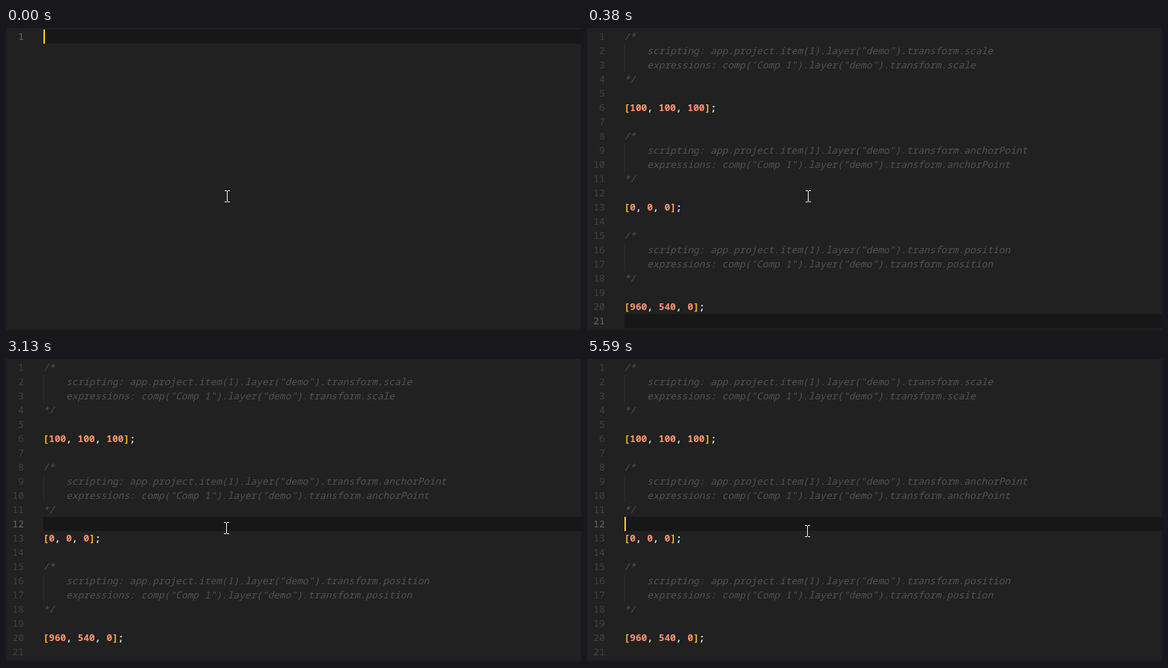
An HTML page for the animation above (5.64 s loop, 768 px wide and 405 px high).

```html
<!DOCTYPE html>
<html lang="en">
<head>
<meta charset="utf-8">
<title>Code editor</title>
<style>
html, body { margin: 0; width: 100%; height: 100%; overflow: hidden; background: #212121; }
#stage {
  position: relative; width: 768px; height: 405px; overflow: hidden; background: #212121;
  font: 400 12.833px/19px "Noto Sans Mono", "DejaVu Sans Mono", monospace;
  font-variant-ligatures: none; color: #cfeaee;
}
#stage div, #stage svg { position: absolute; }
.view { inset: 0; }
.line { left: 0; width: 768px; height: 19px; white-space: pre; }
.line i, .line b { position: absolute; top: 0; height: 19px; font-style: normal; font-weight: 400; }
.line i { right: 744px; color: #424242; }
.line b { left: 50px; font-weight: 600; text-indent: -.5px; }
.line .comment { color: #535353; font-style: italic; font-weight: 400; }
.num { color: #ff946f; }
.bracket { color: #ffb62c; font-weight: 800; }
.guide::before { content: ""; position: absolute; left: 50px; width: 1px; height: 19px; background: #2d2d2d; }
.selected b { padding-right: 7.7px; background: #2b2b2a; border-radius: 2px; }
.selected .guide::before { content: none; }
.active { background: linear-gradient(90deg, #212121 50px, #171717 50px); }
.active i { color: #686868; }
#caret { left: 50px; width: 2px; height: 19px; background: #fc0; }
#fade { left: 0; right: 0; bottom: 0; height: 4px; background: linear-gradient(#21212100, #1a1a1a); }

/* 1% = 56.4 ms */
#stage .anim { animation: 5640ms step-end infinite; }
#stage #first { animation-name: first; }
#stage #raw { animation-name: raw; }
#stage #tidy { animation-name: tidy; }
#stage #last { animation-name: last; }
#stage #middle { animation-name: middle; }
#stage #caret { animation-name: blink, caretLine; }
#stage #mouse { animation-name: mouse; }
@keyframes first { 0% { opacity: 1 } 4.964%, 100% { opacity: 0 } }
@keyframes raw { 0% { opacity: 0 } 4.964% { opacity: 1 } 6.737%, 100% { opacity: 0 } }
@keyframes tidy { 0% { opacity: 0 } 6.737%, 100% { opacity: 1 } }
@keyframes last { 0% { opacity: 0 } 6.737% { opacity: 1 } 11.702%, 100% { opacity: 0 } }
@keyframes middle { 0% { opacity: 0 } 11.702%, 100% { opacity: 1 } }
@keyframes caretLine { 0% { top: 2px } 11.702%, 100% { top: 211px } }
@keyframes blink {
  0%, 11.702%, 28.9%, 46.453%, 64.539%, 81.914%, 99.113%, 100% { opacity: 1 }
  1.773%, 20.39%, 37.943%, 55.496%, 72.163%, 90.07% { opacity: 0 }
}
@keyframes mouse {
  0% { transform: translate(292px, 217px) }
  15.425% { transform: translate(292px, 218px) }
  29.787% { transform: translate(291px, 218px) }
  86.879% { transform: translate(291px, 219px) }
  96.808% { transform: translate(291px, 220px) }
  98.049% { transform: translate(291px, 221px) }
  99.113%, 100% { transform: translate(291px, 222px) }
}
</style>
</head>
<body>
<div id="stage">
  <div id="first" class="view anim"></div>
  <div id="raw" class="view anim selected"></div>
  <div id="tidy" class="view anim"></div>
  <div id="last" class="view anim"></div>
  <div id="middle" class="view anim"></div>
  <div id="caret" class="anim"></div>
  <div id="fade"></div>
  <svg id="mouse" class="anim" width="7" height="16" shape-rendering="crispEdges" fill="#f2f2f2">
    <path d="M0 0h3v1h1v-1h3v1h-3v14h3v1h-3v-1h-1v1h-3v-1h3v-14h-3z"/>
  </svg>
</div>
<script>
const props = [
  ['scale', '[100, 100, 100];'],
  ['anchorPoint', '[0, 0, 0];'],
  ['position', '[960, 540, 0];']
];

const block = ([name, value]) => [
  '/*',
  `    scripting: app.project.item(1).layer("demo").transform.${name}`,
  `    expressions: comp("Comp 1").layer("demo").transform.${name}`,
  '*/', '', value, ''
];

const paint = text => text
  .replace(/\d+/g, '<span class="num">$&</span>')
  .replace(/[[\]]/g, '<span class="bracket">$&</span>');

function line(text, number, extra = '') {
  const isCode = text.startsWith('[');
  const guide = text.startsWith(' ') ? 'guide' : '';
  const body = isCode ? paint(text) : text;
  return `<div class="line ${guide} ${extra}" style="top:${2 + 19 * (number - 1)}px">` +
    `<i>${number}</i><b class="${isCode ? '' : 'comment'}">${body}</b></div>`;
}

function fill(id, html) {
  document.getElementById(id).innerHTML = html;
}

const listing = lines => lines.slice(0, 21).map((text, i) => line(text, i + 1)).join('');

fill('raw', listing(['', ...props.flatMap(p => [...block(p), ''])]));
fill('tidy', listing(props.flatMap(block)));
fill('first', line('', 1, 'active'));
fill('last', line('', 21, 'active'));
fill('middle', line('', 12, 'active'));
</script>
</body>
</html>
```
